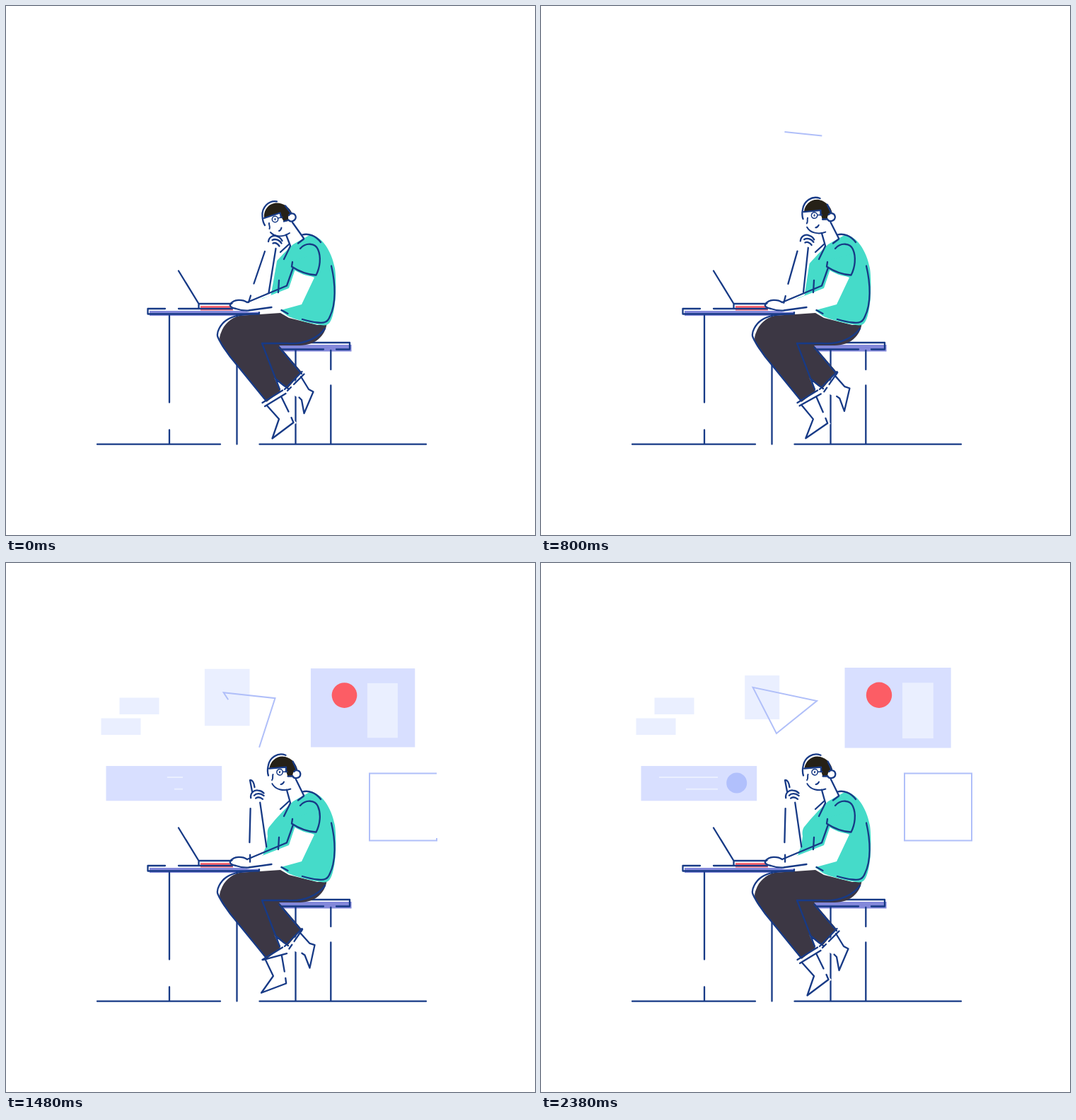
These frames come from a looping animation (748 by 748 pixels, 2400 ms). An HTML page:

```html
<!DOCTYPE html>
<html lang="en">
<head>
<meta charset="utf-8">
<title>Thinking at the desk</title>
<style>
  html, body { margin: 0; width: 100%; height: 100%; overflow: hidden; background: #fff; }
  svg { display: block; width: 100vw; height: 100vh; }
  .ink { fill: none; stroke: #173a86; stroke-width: 2.3; stroke-linecap: round; stroke-linejoin: round; }
  .thin { fill: none; stroke: #b0bff9; stroke-width: 2; }
  .pale { fill: #eaefff; }
  .mid { fill: #d8dfff; }
  .white { fill: #fff; }
  .teal { fill: #45dbc9; }
  .pants { fill: #3c3744; }
  .lilac { fill: #8388da; }
  .red { fill: #fc5d65; }
</style>
</head>
<body>
<svg viewBox="0 0 748 748" xmlns="http://www.w3.org/2000/svg">
  <!-- wall -->
  <g id="bricks" class="pale">
    <rect x="160.5" y="190.5" width="56" height="23.5"/>
    <rect x="134.5" y="219.5" width="56" height="23.5"/>
  </g>
  <g id="banner">
    <rect class="mid" x="141.5" y="287" width="163.7" height="49.3"/>
  </g>
  <path id="line1" pathLength="1" d="M250 303H167" fill="none" stroke="#eaefff" stroke-width="2"/>
  <path id="line2" pathLength="1" d="M250 319.7H205" fill="none" stroke="#eaefff" stroke-width="2"/>
  <circle id="dot" cx="276.7" cy="311" r="14.5" fill="#b1c0fc"/>
  <rect id="card" class="pale" x="288.2" y="159" width="49" height="62"/>
  <g id="panel">
    <rect class="mid" x="429.5" y="148" width="150.2" height="113.5"/>
    <circle class="red" cx="478" cy="186.7" r="18.2"/>
    <rect class="pale" x="511" y="169.3" width="43.8" height="78.7"/>
  </g>
  <path id="frame" class="thin" pathLength="1" d="M609 297.5H514V392.5H609Z"/>
  <path id="tri" class="thin" pathLength="1" d="M299.5 176L333 241L390 195Z"/>

  <!-- furniture -->
  <path class="lilac" d="M203 431H359V438H203ZM386 479H488.5V488.5H386Z"/>
  <rect class="red" x="275" y="424" width="46" height="6.5" opacity=".92"/>
  <path class="ink" d="M129 619.7H303M358.500 619.7H594M231 438V560.500M231 599.500V619M326.500 437V440M326.500 500V619.500
    M409.500 487V619M459.300 487V514M459.300 536.500V619
    M225 428H200.500V435.500H358V433M244 428H320
    M244 374.500L272.500 421H325M272.500 421V427.500
    M420 476H486V485.500H467M449 485.500H388"/>

  <!-- feet -->
  <g id="backFoot">
    <path class="white" d="M396 545L418 521L428 542L434.500 545.500L421.500 576L418 557L405 549Z"/>
    <path class="ink" d="M417 524L428 542L434.500 545.500L421.500 576L418 557L414.500 553.500M398 544L403 539M407 535L421.500 520.500"/>
  </g>
  <g id="frontFoot">
    <path class="white" d="M368 564L386 584L377 611L411 589.500L404 582L391 548Z"/>
    <path class="ink" d="M369 565L386 584L376.500 611.500L406.500 589L403.500 582M389.500 553L399.500 573.500M366 566L395.500 548"/>
  </g>

  <!-- legs -->
  <path class="pants" d="M330 438L388 434L400 441L440 451L453.500 450C451 466 438 480 415 480H386L418 517.500L398 541L379.500 526L388 544.500L369 559.500L308 485C301 476 301 469 304 462C308 450 318 441 330 438Z"/>
  <path class="ink" d="M357 435.500C335 435 321 438 312 444C303 450 297 462 299.500 468C303 477 310 486 317 496L368 558.500
    M362.500 561L391 543.500M362 477H398C422 479 442 469 451 456M362 477L387 542M381 527L392 536L399 541M386.500 483L418 520M394 542L418.500 517"/>

  <!-- torso -->
  <path class="teal" d="M406 337L430 323.500C446 325 460 345 465 371C467 384 467 412 464 428C461 444 458 452 449 451.500C428 449 405 442 398 438L386 429L362 414L368 400L370 386C369 379 370 375 374 371C382 361 392 350 406 337Z"/>
  <path id="armFill" class="white"/>
  <path class="white" d="M341 419L363 413.500L400 399L409 372L436 384L418 422L387 430.500L345 433L326 429L319 427C316 424 321 417 332 417Z"/>
  <path class="teal" d="M437 383C425 382 414 378 406 372L405 360L440 350V383Z"/>
  <path class="ink" d="M388 348L400 337M393 358L402 339.500M413 335.500L421 329.500M419 323.500C428 321 438 325 445 334
    M416 343C424 334 437 335 441 344C446 355 444 370 438.500 380.500C427 380 414 375 404 368.500L405 362
    M460 367.500C466 393 467 421 458 439C455 447 450 449 440 447.500C433 447 426 445 419 443
    M389.500 430L398.500 435M386 388L385 405
    M406 370L397 395.500L341 419M341 419C334 414 322 415 317.500 421C315 425 320 427 325 428C331 430 337 431 343 430.500L375.500 426"/>

  <!-- raised arm -->
  <g id="arm" class="ink">
    <path d="M366 347L350.500 392.500M346 409.500L343 419M381.500 343L371.500 405.500"/>
    <path d="M371 333C372 326 379 323 384 326C387 327 389 329 390.500 332M376.500 331C380 329 386 330 389.500 335.500M377.500 335.500C381 334 384 336 386.500 339.500"/>
    <path id="finger" pathLength="1" transform="rotate(17.300 356 414)" d="M348 323L345 307C348 306 350.500 310 351.500 317"/>
  </g>

  <!-- head -->
  <path id="neck" class="ink"/>
  <g id="head">
    <path fill="#262117" d="M365 299.500C364 288 372 278.500 383 278.500C393 278.500 401 285 404.500 293L400 297L399 304L393 305L389 298L387 292.500Z"/>
    <circle class="white" cx="404.500" cy="299" r="5.500"/>
    <g class="ink">
      <path d="M383 276.300C371 274.500 361.500 285 362.500 297C362.700 302 364 307 366 310M365 300L387.500 292.500L389 299M395 282.500L403 293M393 304.500L398.500 303M400 296C402 292 408 292.500 409.500 297C411 303 403 307 399.500 302.500"/>
      <path stroke-width="2" d="M372 307C371.500 310 374 312 372.500 315M389.500 313.500C389 316 388 317.500 386 318M374 320C380 327 392 327 401 321"/>
      <g stroke-width="1.500"><circle cx="380.500" cy="301.500" r="4.200"/><path d="M384.500 300L391 298.500"/></g>
      <ellipse cx="380.500" cy="301.500" rx=".6" ry="1.200" stroke-width="1"/>
    </g>
  </g>
</svg>
<script>
const LOOP = 2400;
const el = {};
document.querySelectorAll('[id]').forEach(n => el[n.id] = n);

const part = (t, a, b) => Math.min(1, Math.max(0, (t - a) / (b - a)));
const smooth = (t, a, b) => { const x = part(t, a, b); return x * x * (3 - 2 * x); };
const outCubic = x => 1 - (1 - x) ** 3;
const outBack = x => x <= 0 ? 0 : 1 - 2.2 * (1 - x) ** 3 + 1.2 * (1 - x) ** 2;
const mix = (a, b, p) => a + (b - a) * p;

function spin(name, deg, x, y) {
  el[name].setAttribute('transform', `rotate(${deg} ${x} ${y})`);
}
function zoom(name, s, x, y) {
  el[name].style.display = s > 0 ? '' : 'none';
  el[name].setAttribute('transform', `translate(${x} ${y}) scale(${s}) translate(${-x} ${-y})`);
}
function trim(name, p) {
  el[name].style.display = p > 0 ? '' : 'none';
  el[name].setAttribute('stroke-dasharray', p < 1 ? `${p} 2` : 'none');
}
function turn(x, y, deg, cx, cy) {
  const a = deg * Math.PI / 180, c = Math.cos(a), s = Math.sin(a);
  return [cx + (x - cx) * c - (y - cy) * s, cy + (x - cx) * s + (y - cy) * c];
}

function draw(t) {
  // wall pieces
  zoom('bricks', outBack(part(t, 1080, 1366)), 175.5, 216.8);
  zoom('banner', outBack(part(t, 1075, 1458)), 223.3, 311.6);
  zoom('panel', outCubic(part(t, 1153, 1600)), 504.6, 204.8);
  zoom('card', 1.3 * outCubic(part(t, 1200, 1460)) - 0.3 * smooth(t, 1460, 1900), 312.7, 190);
  trim('line1', part(t, 1284, 2024));
  trim('line2', part(t, 1284, 2024));
  el.dot.setAttribute('opacity', part(t, 1560, 1960));
  trim('frame', part(t, 954, 1648));
  trim('tri', part(t, 457, 2002));
  spin('tri', (t - 2380) * 360 / LOOP, 346.4, 206.2);

  // feet
  spin('backFoot', -13 * (smooth(t, 0, 1160) - smooth(t, 1160, 2380)), 407, 532);
  spin('frontFoot', 16.3 * (smooth(t, 580, 1520) - smooth(t, 1520, 2380)), 382, 555.5);

  // head and neck
  const tilt = 13.7 * smooth(t, 0, 960);
  spin('head', tilt, 408, 326);
  const nape = turn(405, 306, tilt, 408, 326);
  const throat = turn(396, 323.5, tilt, 408, 326);
  el.neck.setAttribute('d', `M${nape}L421 328.5M${throat}L402 339`);

  // forearm
  const lift = smooth(t, 580, 1420);
  spin('arm', -17.3 * lift, 356, 414);
  spin('armFill', -17.3 * lift, 356, 414);
  el.armFill.setAttribute('d',
    `M366 347L385.5 345L383 361L${mix(374.5, 364, lift)} ${mix(409.5, 415, lift)}L343 419Z`);
  trim('finger', part(t, 880, 1060));
}

function tick(now) {
  draw(now % LOOP);
  requestAnimationFrame(tick);
}
draw(0);
requestAnimationFrame(tick);
</script>
</body>
</html>
```
